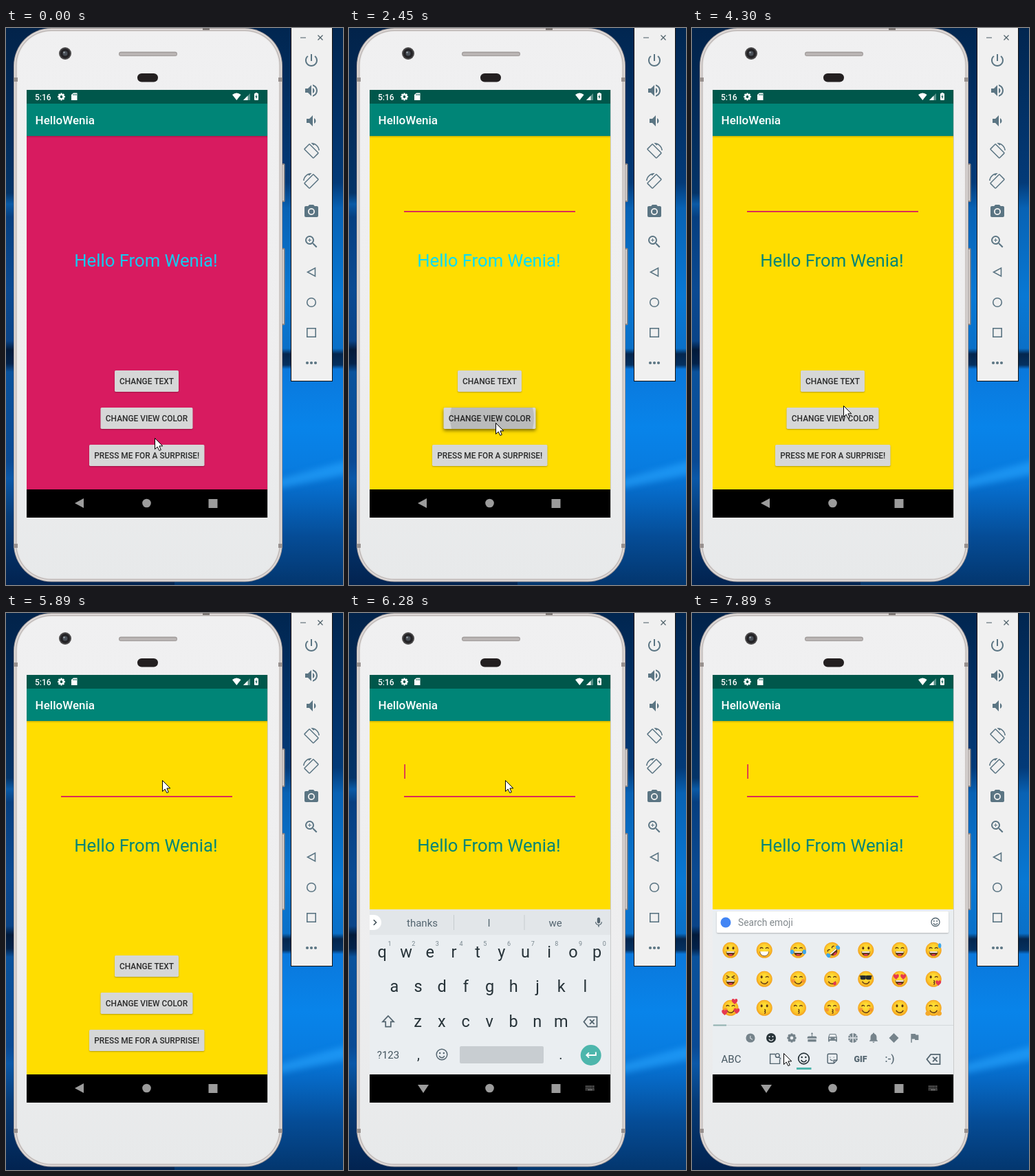
An HTML page with a canvas for the animation above (8000 ms loop, 490x810 px).

```html
<!DOCTYPE html>
<html lang="en">
<head>
<meta charset="utf-8">
<title>Phone emulator</title>
<style>
html, body { margin: 0; width: 100%; height: 100%; overflow: hidden; background: #02284f; }
canvas { display: block; }
</style>
</head>
<body>
<canvas id="stage" width="490" height="810"></canvas>
<script>
const g = document.getElementById('stage').getContext('2d');
const LOOP = 8000, NAME = 'Wenia';
const ACCENT = '#d81b60', TEAL = '#008577', YELLOW = '#ffdd00';
const INK = '#263238', GREY = '#546570', TOOL = '#5b7583';
const TURN = Math.PI * 2;

// time, x, y of the pointer; each place holds until the next
const POINTER = [
  [0, 216, 596], [120, 214, 585], [240, 209, 565], [360, 205, 548], [480, 203, 540],
  [630, 204, 526], [750, 205, 518], [1870, 212, 527], [2020, 213, 564], [2180, 213, 574],
  [2750, 217, 587], [2870, 221, 601], [3020, 226, 612], [3140, 228, 617], [3290, 228, 618],
  [4150, 225, 601], [4300, 220, 549], [4420, 219, 535], [4570, 218, 526], [4850, 218, 524],
  [4970, 218, 522], [5090, 218, 520], [5240, 221, 450], [5360, 225, 320], [5480, 227, 243],
  [6560, 229, 251], [6710, 235, 275], [6830, 230, 350], [6950, 205, 470], [7070, 170, 570],
  [7190, 145, 625], [7310, 133, 640]
];
const BLINKS = [2600, 3140, 3600, 4150, 4570, 5090, 5480, 5890, 6160, 6830, 7460];

const ICON = {
  power: 'M13 3h-2v10h2V3zm4.83 2.17l-1.42 1.42A6.92 6.92 0 0119 12c0 3.87-3.13 7-7 7s-7-3.13-7-7c0-2.19 1.01-4.14 2.58-5.42L6.17 5.17A8.93 8.93 0 003 12c0 4.97 4.03 9 9 9s9-4.03 9-9c0-2.74-1.23-5.18-3.17-6.83z',
  louder: 'M3 9v6h4l5 5V4L7 9H3zm13.5 3A4.5 4.5 0 0014 7.97v8.05c1.48-.73 2.5-2.25 2.5-4.02zM14 3.23v2.06c2.89.86 5 3.54 5 6.71s-2.11 5.85-5 6.71v2.06c4.01-.91 7-4.49 7-8.77s-2.99-7.86-7-8.77z',
  quieter: 'M18.5 12A4.5 4.5 0 0016 7.97v8.05c1.48-.73 2.5-2.25 2.5-4.02zM5 9v6h4l5 5V4L9 9H5z',
  rotate: 'M16.48 2.52c3.27 1.55 5.61 4.72 5.97 8.48h1.5C23.44 4.84 18.29 0 12 0l-.66.03 3.81 3.81zM10.23 1.75c-.59-.59-1.54-.59-2.12 0L1.75 8.11c-.59.59-.59 1.54 0 2.12l12.02 12.02c.59.59 1.54.59 2.12 0l6.36-6.36c.59-.59.59-1.54 0-2.12zm4.6 19.44L2.81 9.17l6.36-6.36 12.02 12.02z',
  camera: 'M12 8.8a3.2 3.2 0 100 6.4 3.2 3.2 0 100-6.4zM9 2L7.17 4H4c-1.1 0-2 .9-2 2v12c0 1.1.9 2 2 2h16c1.1 0 2-.9 2-2V6c0-1.1-.9-2-2-2h-3.17L15 2H9zm3 15c-2.76 0-5-2.24-5-5s2.24-5 5-5 5 2.24 5 5-2.24 5-5 5z',
  zoom: 'M15.5 14h-.79l-.28-.27A6.47 6.47 0 0016 9.5 6.5 6.5 0 109.5 16c1.61 0 3.09-.59 4.23-1.57l.27.28v.79l5 4.99L20.49 19l-4.99-5zm-6 0C7.01 14 5 11.99 5 9.5S7.01 5 9.5 5 14 7.01 14 9.5 11.99 14 9.5 14zM12 10h-2v2H9v-2H7V9h2V7h1v2h2v1z',
  mic: 'M12 14c1.66 0 3-1.34 3-3V5c0-1.66-1.34-3-3-3S9 3.34 9 5v6c0 1.66 1.34 3 3 3zm5.3-3c0 3-2.54 5.1-5.3 5.1S6.7 14 6.7 11H5c0 3.41 2.72 6.23 6 6.72V21h2v-3.28c3.28-.48 6-3.3 6-6.72z',
  clock: 'M12 2a10 10 0 100 20 10 10 0 000-20zm4.2 14.2L11 13V7h1.5v5.2l4.5 2.7z',
  cake: 'M11 7h2v2h6c1.6 0 3 1.3 3 3v2H2v-2c0-1.7 1.4-3 3-3h6zM3 15.5h18V21H3zM12 6a2 2 0 002-2l-2-3.5L10 4a2 2 0 002 2z',
  car: 'M18.9 6c-.2-.6-.8-1-1.4-1h-11c-.7 0-1.2.4-1.4 1L3 12v8c0 .6.4 1 1 1h1c.6 0 1-.4 1-1v-1h12v1c0 .6.4 1 1 1h1c.6 0 1-.4 1-1v-8zM6.5 16a1.5 1.5 0 110-3 1.5 1.5 0 010 3zm11 0a1.5 1.5 0 110-3 1.5 1.5 0 010 3zM5 11l1.5-4.5h11L19 11z',
  bell: 'M12 22c1.1 0 2-.9 2-2h-4a2 2 0 002 2zm6-6v-5c0-3.07-1.64-5.64-4.5-6.32V4a1.5 1.5 0 00-3 0v.68C7.63 5.36 6 7.92 6 11v5l-2 2v1h16v-1z',
  gem: 'M12 2l10 10-10 10L2 12z',
  flag: 'M14.4 6L14 4H5v17h2v-7h5.6l.4 2h7V6z',
  shift: 'M12 3.5L3.5 12.5H8V20h8v-7.5h4.5z',
  erase: 'M8 4.5h14v15H8L2 12zM11 8.5l7 7M18 8.5l-7 7',
  enter: 'M20 7v5H5M9 8l-4 4 4 4',
  chevron: 'M8 5l7 7-7 7',
  sticker: 'M5 3h14c1 0 2 1 2 2v10l-6 6H5c-1 0-2-1-2-2V5c0-1 1-2 2-2zM15 21v-6h6M8 9v1M15 9v1M8 13c1 2 3 3 5 3',
  seek: 'M12 4H3v17h17v-8M16 3a3.5 3.5 0 100 7 3.5 3.5 0 000-7zM18.5 9l3.5 3.5',
  heart: 'M12 21C5 15 2 12 2 8a5 5 0 0110-2 5 5 0 0110 2c0 4-3 7-10 13z'
};
const paths = {};
for (const k in ICON) paths[k] = new Path2D(ICON[k]);

// a negative flip mirrors the icon
function icon(name, x, y, s, color, line, flip = 1) {
  g.save();
  g.translate(x, y);
  g.scale(s * flip, s);
  g.translate(-12, -12);
  if (line) {
    g.strokeStyle = color;
    g.lineWidth = line;
    g.stroke(paths[name]);
  } else {
    g.fillStyle = color;
    g.fill(paths[name], 'evenodd');
  }
  g.restore();
}
function rect(x, y, w, h, c) { g.fillStyle = c; g.fillRect(x, y, w, h); }
function round(x, y, w, h, r, c) {
  g.fillStyle = c;
  g.beginPath();
  g.roundRect(x, y, w, h, r);
  g.fill();
}
function disc(x, y, r, c, ry = r) {
  g.fillStyle = c;
  g.beginPath();
  g.ellipse(x, y, r, ry, 0, 0, TURN);
  g.fill();
}
function arc(x, y, r, a, b, c, w) {
  g.strokeStyle = c;
  g.lineWidth = w;
  g.beginPath();
  g.arc(x, y, r, a, b);
  g.stroke();
}
const ring = (x, y, r, c, w) => arc(x, y, r, 0, TURN, c, w);
function poly(pts, fill, line, w = 1, open) {
  g.beginPath();
  for (let i = 0; i < pts.length; i += 2) g.lineTo(pts[i], pts[i + 1]);
  if (!open) g.closePath();
  if (fill) { g.fillStyle = fill; g.fill(); }
  if (line) { g.strokeStyle = line; g.lineWidth = w; g.stroke(); }
}
function text(s, x, y, size, c, align = 'center', weight = 400) {
  g.font = `${weight} ${size}px Roboto, sans-serif`;
  g.textAlign = align;
  g.fillStyle = c;
  g.fillText(s, x, y);
}
function fade(y0, y1, stops) {
  const f = g.createLinearGradient(0, y0, 0, y1);
  stops.forEach(([y, c]) => f.addColorStop((y - y0) / (y1 - y0), c));
  return f;
}

function wallpaper() {
  rect(0, 0, 245, 810, fade(0, 810, [[0, '#02234a'], [240, '#043468'], [256, '#0a5aa6'], [275, '#063f80'],
    [380, '#0b4a92'], [455, '#0a4488'], [468, '#021a3a'], [488, '#03224a'], [500, '#0a529c'],
    [630, '#0a4a94'], [655, '#0b58a8'], [710, '#063c78'], [810, '#022350']]));
  rect(245, 0, 245, 810, fade(0, 810, [[0, '#012650'], [225, '#033a78'], [262, '#0862b4'], [390, '#0878d4'],
    [466, '#0a70c8'], [474, '#04264e'], [490, '#05305f'], [496, '#0a78dc'], [580, '#0884ea'],
    [640, '#087ce0'], [680, '#0668c4'], [740, '#054c96'], [810, '#03366e']]));
  g.save();
  g.filter = 'blur(4px)';
  poly([395, 656, 500, 628, 500, 648, 395, 670], 'rgba(40,165,255,.6)');
  g.restore();
}

function device() {
  round(401, 197, 4.5, 56, 1.5, '#8f8886');
  round(401, 320, 4.5, 112, 1.5, '#8f8886');
  rect(402, 199, 2, 52, '#d5d0cf');
  rect(402, 322, 2, 108, '#d5d0cf');
  [[0, '#a39b99'], [1, '#dfdad9'], [3, '#bab4b2'], [4.2, '#e2dfde']].forEach(([d, c]) =>
    round(11 + d, d, 391 - 2 * d, 805.5 - 2 * d, 55 - d, c));
  round(16.5, 5, 380, 795.5, 49.5, fade(0, 810, [[0, '#f0f0f1'], [500, '#eeeeef'], [810, '#e7e9ea']]));
  [72, 750].forEach(y => { rect(11, y, 6, 6, '#98918f'); rect(396, y, 6, 6, '#98918f'); });
  rect(286, 0, 10, 3, '#7d7775');
  disc(86, 37, 9, '#4b4a4b');
  disc(86, 37, 7, '#242326');
  disc(86, 37, 3.5, '#4a5058');
  disc(84.5, 35.5, 1.3, '#9aa3aa');
  round(164, 34.5, 85, 6.5, 3.2, '#a09b9a');
  round(165, 36, 83, 4, 2, '#bab5b4');
  round(191, 66, 30, 12.5, 6.2, '#231f20');
  rect(380, 90, 1, 622, '#cacaca');
}

function statusBar() {
  rect(30, 90, 350, 20, '#00574b');
  rect(30, 110, 350, 47, TEAL);
  text('5:16', 42, 104.5, 12, '#fff', 'left', 500);
  g.save();
  g.translate(80.5, 100);
  for (let i = 0; i < 8; i++) { g.rotate(TURN / 8); rect(-1.2, -5.4, 2.4, 3, '#fff'); }
  ring(0, 0, 3, '#fff', 2.2);
  g.restore();
  poly([95, 97, 98, 94.5, 103.5, 94.5, 103.5, 105, 95, 105], '#fff');
  [97.5, 99.6, 101.6].forEach(x => rect(x, 96, 1, 2, '#00574b'));
  g.fillStyle = '#fff';
  g.fill(new Path2D('M329 97Q335.3 92 341.6 97L335.3 105z'));
  poly([345, 105, 355, 105, 355, 95], 'rgba(255,255,255,.35)');
  poly([345, 105, 351.5, 105, 351.5, 98.5], '#fff');
  round(361, 95, 6, 10, 1, '#fff');
  rect(362.7, 94, 2.6, 1.5, '#fff');
  poly([364.5, 96.5, 362.3, 100.5, 363.8, 100.5, 363.5, 103.5, 365.7, 99.5, 364.2, 99.5], '#00574b');
  text('Hello' + NAME, 42.6, 140, 17, '#fff', 'left', 500);
}

// press: 0 idle, 1 growing ripple, 2 full, 3 fading
function button(label, x, y, w, press, rx) {
  g.save();
  g.shadowColor = press === 1 ? 'rgba(0,0,0,.5)' : 'rgba(0,0,0,.28)';
  g.shadowBlur = press === 1 ? 5 : 2;
  g.shadowOffsetY = press === 1 ? 2.5 : 1;
  round(x, y, w, 31, 1.7, '#d6d7d7');
  g.restore();
  if (press) {
    g.save();
    g.beginPath();
    g.roundRect(x, y, w, 31, 1.7);
    g.clip();
    disc(rx, y + 15.5, press === 1 ? 61 : 200, `rgba(0,0,0,${[0, .13, .1, .04][press]})`);
    g.restore();
  }
  text(label, x + w / 2, y + 20, 11.9, 'rgba(0,0,0,.8)', 'center', 500);
}

function navBar(typing) {
  const c = '#9c9c9c';
  rect(30, 671, 350, 41, '#000');
  if (typing) {
    poly([100, 686, 116, 686, 108, 698], c);
    for (let i = 0; i < 6; i++)
      for (let j = 0; j < 2; j++) rect(344 + i * 2.2, 687.5 + j * 2.6, 1.4, 1.5, c);
    rect(344, 692.7, 1.4, 1.5, c);
    rect(346.5, 692.7, 8, 1.5, c);
    rect(355.2, 692.7, 1.4, 1.5, c);
  } else poly([100, 691, 113, 684, 113, 698], c);
  disc(204.5, 691, 6.3, c);
  rect(294.5, 685, 13, 13, c);
}

function smiley(x, y, r, c, w) {
  ring(x, y, r, c, w);
  disc(x - r * .36, y - r * .25, r * .16, c);
  disc(x + r * .36, y - r * .25, r * .16, c);
  arc(x, y + r * .1, r * .5, .3, Math.PI - .3, c, w);
}

function keyboard() {
  rect(30, 431, 350, 240, '#eaeef1');
  rect(30, 431, 350, 37, '#e2e6e9');
  round(20, 439, 27, 22, 11, '#fff');
  icon('chevron', 38, 450, .55, '#37474f', 2.6);
  text('thanks', 106.5, 455.5, 15, GREY);
  text('I', 203.5, 455.5, 15, GREY);
  text('we', 300, 455.5, 15, GREY);
  [152, 254.5].forEach(x => rect(x, 439, 1, 22, '#c5cbcf'));
  icon('mic', 363, 450, .72, GREY);
  const row = (keys, x, y) => [...keys].forEach((k, i) => text(k, x + i * 34.7, y, 23.5, INK));
  row('qwertyuiop', 48.3, 501);
  row('asdfghjkl', 65.8, 551);
  row('zxcvbnm', 100.2, 601.5);
  [...'1234567890'].forEach((d, i) => text(d, 59 + i * 34.7, 484, 9, '#78868e'));
  icon('shift', 57, 594, .95, GREY, 1.8);
  icon('erase', 351, 594.5, .95, GREY, 1.9);
  text('?123', 57, 648, 15, '#455660');
  text(',', 101, 649, 20, INK);
  smiley(135, 642, 7.8, GREY, 1.5);
  round(161, 630, 122, 25, 2, '#c8cdd1');
  text('.', 308, 649, 20, INK);
  disc(351.7, 643, 15, '#4db6ac');
  icon('enter', 351.7, 643, .9, '#fff', 2.2);
}

// eyes, mouth, extras
const FACES = ['oD ^T ^Dt ^Dtr oD ^D ^Dd', 'xD wu ^ub ^p su hD wkl', '^ubH ok ^k ^kb ^ub ou ^ua'];

function face(x, y, code) {
  const [eye, mouth, ...extra] = code, has = e => extra.includes(e);
  const dark = '#5b3517', red = '#e53950';
  g.save();
  g.translate(x, y);
  if (has('r')) g.rotate(-.7);
  const skin = g.createRadialGradient(0, -3, 2, 0, 0, 12);
  skin.addColorStop(0, '#ffe036');
  skin.addColorStop(.65, '#fcc62a');
  skin.addColorStop(1, '#f09a1e');
  disc(0, 0, 11.5, skin);
  if (has('b')) { disc(-7, 2.5, 2.6, 'rgba(240,110,60,.55)'); disc(7, 2.5, 2.6, 'rgba(240,110,60,.55)'); }
  [-4, 4].forEach(ex => {
    if (eye === 'h') icon('heart', ex * 1.3, -3, .4, red);
    else if (eye === 's') round(ex - 4, -5, 8, 6, 2.5, '#262b30');
    else if (eye === 'x') {
      const s = Math.sign(ex);
      poly([ex + s * 2, -5, ex - s * 1.8, -2.8, ex + s * 2, -.8], 0, dark, 1.4, true);
    } else if (eye === 'o' || (eye === 'w' && ex < 0)) disc(ex, -3, 1.5, dark, 2.1);
    else arc(ex, -1.5, 2.2, Math.PI * 1.1, Math.PI * 1.9, dark, 1.4);
  });
  if (eye === 's') rect(-9, -5, 18, 1.5, '#262b30');
  if (mouth === 'D' || mouth === 'T') {
    g.beginPath();
    g.arc(0, 2, 6.5, 0, Math.PI);
    g.closePath();
    g.fillStyle = mouth === 'T' ? '#fff' : dark;
    g.fill();
    if (mouth === 'T') arc(0, 2, 6.5, 0, Math.PI, dark, .8);
    else { rect(-5.6, 2, 11.2, 1.8, '#fff'); disc(0, 7, 3, red, 1.4); }
  } else if (mouth === 'k') {
    arc(0, 3.6, 1.5, -1.6, 1.6, dark, 1.3);
    arc(0, 6.4, 1.5, -1.6, 1.6, dark, 1.3);
  } else {
    arc(0, 1.5, 5.5, .35, Math.PI - .35, dark, 1.4);
    if (mouth === 'p') disc(4, 6.5, 2.3, red, 2.6);
  }
  if (has('t')) { disc(-9, 2.5, 2.6, '#3ba7ee', 3.4); disc(9, 2.5, 2.6, '#3ba7ee', 3.4); }
  if (has('d')) disc(9, -6.5, 2.2, '#3ba7ee', 3.6);
  if (has('l')) icon('heart', 7, 6, .4, red);
  if (has('H')) { icon('heart', -8.5, 7, .42, red); icon('heart', 9, 5, .42, red); icon('heart', 6, -9, .42, red); }
  if (has('a')) { disc(-8, 8, 3.8, '#f4a92c', 3.4); disc(8, 8, 3.8, '#f4a92c', 3.4); }
  g.restore();
}

function emojiPanel() {
  const c = '#75838b';
  rect(30, 431, 350, 240, '#eaeef1');
  g.save();
  g.shadowColor = 'rgba(0,0,0,.25)';
  g.shadowBlur = 2;
  g.shadowOffsetY = 1;
  round(36, 434, 337, 31, 1.5, '#fff');
  g.restore();
  disc(49, 450, 7.5, '#4285f4');
  text('Search emoji', 67, 455, 13.8, '#82898d', 'left');
  smiley(354, 449.5, 6, GREY, 1.3);
  FACES.forEach((r, j) => r.split(' ').forEach((f, i) => face(56 + i * 49.2, 490.3 + j * 42, f)));
  rect(30, 599, 350, 1, '#d3d9dc');
  rect(31, 598.5, 19, 2, '#8fb0ae');
  icon('clock', 85, 618, .66, c);
  disc(115, 618, 7, INK);
  disc(112.6, 616, 1.1, '#eaeef1');
  disc(117.4, 616, 1.1, '#eaeef1');
  arc(115, 618.8, 3.2, .2, Math.PI - .2, '#eaeef1', 1.2);
  for (let i = 0; i < 8; i++) disc(145 + 4.8 * Math.cos(i * TURN / 8), 618 + 4.8 * Math.sin(i * TURN / 8), 2, c);
  ring(145, 618, 3.4, c, 2);
  icon('cake', 174.5, 617.5, .68, c);
  icon('car', 204.5, 617, .72, c);
  disc(234, 618, 7, c);
  poly([227, 618, 241, 618], 0, '#eaeef1', .9);
  poly([234, 611, 234, 625], 0, '#eaeef1', .9);
  ring(227, 618, 4.2, '#eaeef1', .9);
  ring(241, 618, 4.2, '#eaeef1', .9);
  icon('bell', 264, 617.5, .74, c);
  icon('gem', 293.5, 618, .7, c);
  icon('flag', 323.5, 618, .74, c);
  text('ABC', 57, 654, 15, '#455660');
  icon('seek', 121, 648, .82, GREY, 1.8);
  smiley(162.5, 648, 7.8, INK, 1.7);
  rect(152, 661, 21.5, 3, '#4db6ac');
  icon('sticker', 204, 648, .76, GREY, 1.9);
  text('GIF', 245, 652.5, 12.5, GREY, 'center', 900);
  text(':-)', 287.5, 653, 15, GREY, 'center', 500);
  icon('erase', 351, 649, .95, GREY, 1.9);
}

function toolbar() {
  rect(414, 0, 61, 514, '#111');
  rect(415, 0, 59, 513, '#f0f0f0');
  rect(428, 13.5, 8, 1.2, '#66747c');
  poly([453.5, 10.5, 460.5, 17.5], 0, '#52636c', 1.3);
  poly([453.5, 17.5, 460.5, 10.5], 0, '#52636c', 1.3);
  ['power', 'louder', 'quieter', 'rotate'].forEach((n, i) => icon(n, 444, 47 + 44 * i, 1, TOOL));
  icon('rotate', 444, 223, 1, TOOL, 0, -1);
  icon('camera', 444, 267, 1, TOOL);
  icon('zoom', 444, 311, 1, TOOL);
  poly([438.5, 355, 449.5, 349, 449.5, 361], 0, TOOL, 1.6);
  ring(444, 399, 6.3, TOOL, 1.6);
  g.strokeRect(437.8, 436.8, 12.4, 12.4);
  [-6, 0, 6].forEach(d => disc(444 + d, 487, 2.1, TOOL));
}

const pressAt = (t, steps) => {
  const n = steps.filter(s => t >= s).length;
  return n === steps.length ? 0 : n;
};

function app(t) {
  const yellow = t >= 2450, typing = t >= 6160;
  rect(30, 157, 350, 514, yellow ? YELLOW : ACCENT);
  rect(30, 157, 350, 3, fade(157, 160, [[157, 'rgba(0,0,0,.2)'], [160, 'rgba(0,0,0,0)']]));
  statusBar();
  rect(80, 266, 249, 1.8, ACCENT);
  if (BLINKS.filter(b => t >= b).length % 2) rect(80.3, 220, 1.6, 21, ACCENT);
  text(`Hello From ${NAME}!`, 99.2, 346.7, 25.7, t >= 4030 ? TEAL : yellow ? '#00ddff' : '#16caf0', 'left');
  button('CHANGE TEXT', 158, 498, 93, 0);
  button('CHANGE VIEW COLOR', 137.5, 552, 134, pressAt(t, [2450, 2600, 2750, 2870]), 208);
  button('PRESS ME FOR A SURPRISE!', 121, 606, 167.5, pressAt(t, [3880, 4030, 4150]), 215);
  if (typing) {
    g.save();
    g.beginPath();
    g.rect(30, 157, 350, 514);
    g.clip();
    if (t < 6280) g.translate(0, 40);
    if (t < 7890) keyboard(); else emojiPanel();
    g.restore();
  }
  navBar(typing);
}

function pointer(t) {
  const [, x, y] = POINTER.findLast(p => t >= p[0]);
  g.save();
  g.translate(x + .5, y + .5);
  poly([0, 0, 0, 16, 3.7, 12.6, 6.3, 18, 8.8, 17, 6.4, 11.4, 11.3, 11.4], '#fff', '#000', 1);
  g.restore();
}

function draw(now) {
  const t = now % LOOP;
  wallpaper();
  device();
  toolbar();
  app(t);
  pointer(t);
}

const start = performance.now();
function tick() {
  draw(performance.now() - start);
  requestAnimationFrame(tick);
}
tick();
</script>
</body>
</html>
```
